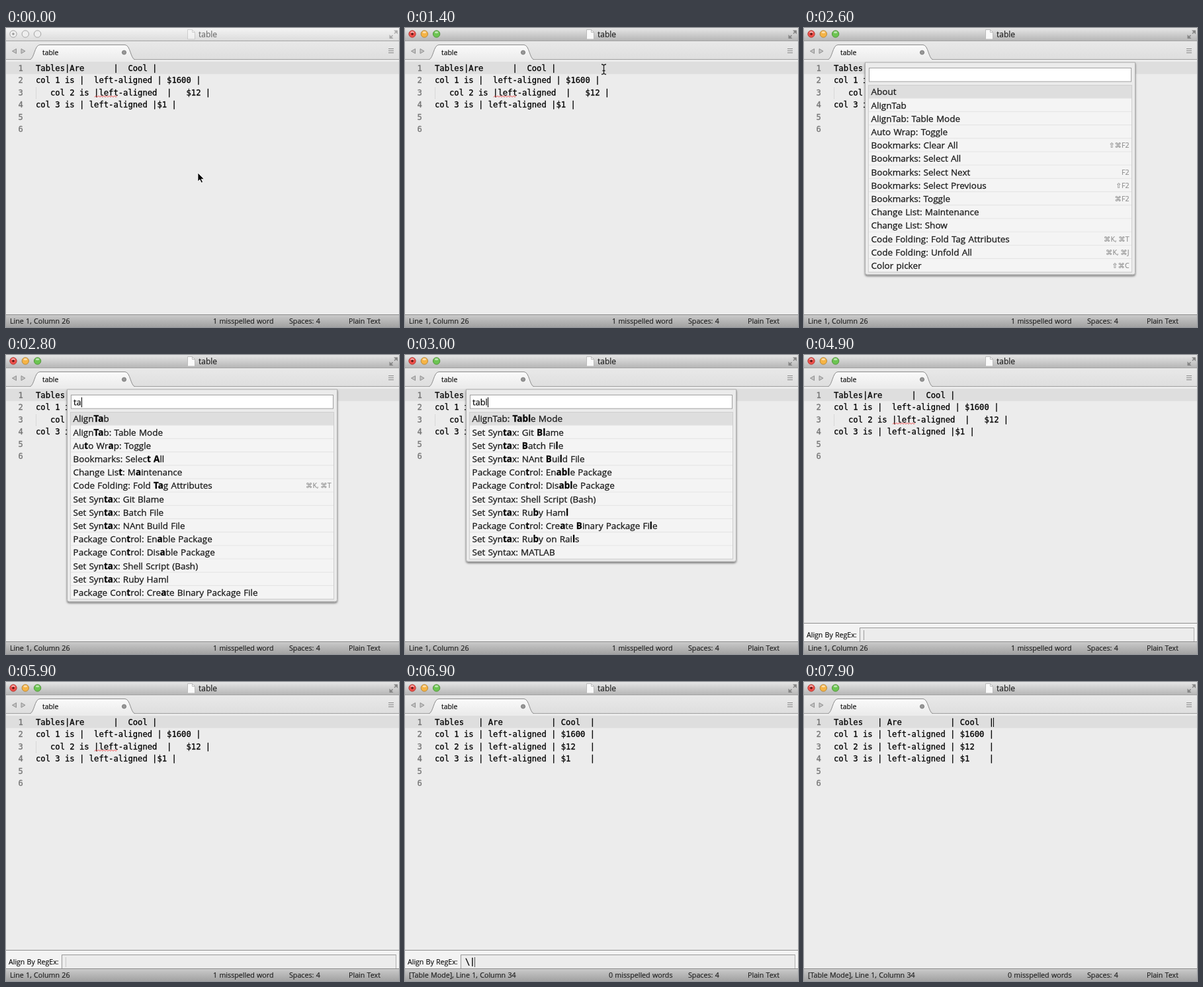
These frames come from a looping animation (594 px wide and 452 px high, 8000 ms). An HTML page:

```html
<!DOCTYPE html>
<html lang="en">
<head>
<meta charset="utf-8">
<title>Table alignment</title>
<style>
html, body { margin: 0; width: 100%; height: 100%; overflow: hidden; background: #ececec; }
svg { display: block; width: 594px; height: 452px; }
text { font: 10.7px "Open Sans", "DejaVu Sans", sans-serif; fill: #1c1c1c; stroke: #1c1c1c; stroke-width: .15px; word-spacing: .5px; white-space: pre; }
.code text { font: 12.2px "DejaVu Sans Mono", monospace; fill: #000; stroke: #000; stroke-width: .3px; word-spacing: 0; }
.code .num { fill: #757575; stroke: #757575; }
.row { font-size: 13.5px; stroke-width: .3px; word-spacing: .7px; }
.row tspan { font-weight: 700; fill: #000; }
.keys { font: 10.5px "Open Sans", "DejaVu Sans", sans-serif; fill: #8e8e8e; stroke: #8e8e8e; word-spacing: 0; text-anchor: end; }
.field { font-size: 12.8px; fill: #000; stroke-width: .25px; }
.end { text-anchor: end; }
</style>
</head>
<body>
<svg viewBox="0 0 594 452" xmlns="http://www.w3.org/2000/svg">
  <defs>
    <linearGradient id="barOn" x2="0" y2="1"><stop stop-color="#e6e6e6"/><stop offset="1" stop-color="#b6b6b6"/></linearGradient>
    <linearGradient id="barOff" x2="0" y2="1"><stop stop-color="#f4f4f4"/><stop offset="1" stop-color="#dcdcdc"/></linearGradient>
    <linearGradient id="strip" x2="0" y2="1"><stop stop-color="#e9e9e9"/><stop offset="1" stop-color="#dedede"/></linearGradient>
    <linearGradient id="tabFill" x2="0" y2="1"><stop stop-color="#fafafa"/><stop offset="1" stop-color="#ececec"/></linearGradient>
    <linearGradient id="status" x2="0" y2="1"><stop stop-color="#c9c9c9"/><stop offset="1" stop-color="#a2a2a2"/></linearGradient>
    <filter id="shadow" x="-5%" y="-5%" width="110%" height="115%">
      <feDropShadow dx="0" dy="2" stdDeviation="1.6" flood-opacity=".5"/>
    </filter>
  </defs>

  <rect width="594" height="452" fill="#ececec"/>
  <rect id="bar" width="594" height="19"/>
  <g id="lights"></g>
  <g id="caption">
    <path d="M274.5 2.5h7l4 4v10.5h-11z" fill="#fafafa" stroke="#bbb"/>
    <path d="M281.5 2.5v4h4" fill="none" stroke="#bbb"/>
    <text x="291" y="14" style="font-size:12px">table</text>
  </g>
  <g id="expand" fill="#858585" stroke="#858585" stroke-width="1.6">
    <path d="M586 3.5h6v6zM579.5 10v6h6z" stroke="none"/>
    <path d="M587 8.5l2.5-2.5M584.5 11l-2.5 2.5"/>
  </g>

  <rect y="19" width="594" height="29" fill="url(#strip)"/>
  <path d="M0 19.5h594" stroke="#a3a3a3"/>
  <path d="M0 47.5H594" stroke="#a0a0a0"/>
  <path d="M36 48C43 46 43 26 51 25.5H180C188 26 188 46 195 48" fill="url(#tabFill)" stroke="#8c8c8c"/>
  <path d="M0 48h594v3H0z" fill="#ececec"/>
  <path d="M15.5 31.5v7l-6-3.5zM23 31.5v7l6-3.5z" fill="#c4c4c4" stroke="#909090"/>
  <text x="55" y="40.5" style="font-size:10.4px;fill:#000">table</text>
  <circle cx="178.5" cy="37" r="3" fill="#999" stroke="#777"/>
  <path d="M578 31.5h8M578 34.5h8M578 37.5h8" stroke="#888" stroke-width="1.2"/>

  <rect y="51" width="594" height="18.5" fill="#dedede"/>
  <g id="code" class="code"></g>
  <rect id="codeCaret" x="286" y="54" width="1" height="14"/>
  <g id="prompt">
    <rect y="405" width="594" height="29" fill="#f3f3f3"/>
    <path d="M0 405.5h594" stroke="#8f8f8f"/>
    <text x="4" y="427" style="font-size:10.6px;fill:#000">Align By RegEx:</text>
    <rect x="84.5" y="412.5" width="505" height="21" fill="#ececec" stroke="#b0b0b0"/>
    <path d="M84.5 433v-20.5h505" fill="none" stroke="#999"/>
    <g class="code"><text id="regex" x="91" y="427"></text></g>
    <rect id="promptCaret" y="416" width="1" height="15"/>
  </g>

  <rect y="434" width="594" height="18" fill="url(#status)"/>
  <path d="M0 433.5h594" stroke="#858585"/>
  <path d="M0 434.5h594" stroke="#d0d0d0"/>
  <text id="place" x="6" y="447"></text>
  <text id="spell" class="end" x="404.5" y="447"></text>
  <text x="428" y="447">Spaces: 4</text>
  <text x="518" y="447">Plain Text</text>

  <g id="palette"></g>
  <rect id="paletteCaret" y="64" width="1" height="15"/>
  <path id="arrow" d="M0 0v13l3-2.8 2.3 4.9 2.2-1-2.3-4.7H9.4z" fill="#000" stroke="#fff" stroke-width=".8"/>
  <path id="beam" d="M-3.5 0Q0 0 0 2.5Q0 0 3.5 0M0 2V13M-3.5 15Q0 15 0 12.5Q0 15 3.5 15M-2 9.5H2" fill="none" stroke="#222" stroke-width="1.3"/>
</svg>
<script>
const LOOP = 8000, STEP = 100, ADVANCE = 7.345;
const $ = id => document.getElementById(id);
const show = (id, on) => { $(id).style.display = on ? "" : "none"; };

const rough = [
  "Tables|Are      |  Cool |",
  "col 1 is |  left-aligned | $1600 |",
  "   col 2 is |left-aligned  |   $12 |",
  "col 3 is | left-aligned |$1 |"
];
const neat = [
  "Tables   | Are          | Cool  |",
  "col 1 is | left-aligned | $1600 |",
  "col 2 is | left-aligned | $12   |",
  "col 3 is | left-aligned | $1    |"
];
const commands = [
  ["About"], ["AlignTab"], ["AlignTab: Table Mode"], ["Auto Wrap: Toggle"],
  ["Bookmarks: Clear All", "⇧⌘F2"], ["Bookmarks: Select All"],
  ["Bookmarks: Select Next", "F2"], ["Bookmarks: Select Previous", "⇧F2"],
  ["Bookmarks: Toggle", "⌘F2"], ["Change List: Maintenance"], ["Change List: Show"],
  ["Code Folding: Fold Tag Attributes", "⌘K, ⌘T"],
  ["Code Folding: Unfold All", "⌘K, ⌘J"], ["Color picker", "⇧⌘C"]
];
const found = [
  "AlignTab: Table Mode", "Set Syntax: Git Blame", "Set Syntax: Batch File",
  "Set Syntax: NAnt Build File", "Package Control: Enable Package",
  "Package Control: Disable Package", "Set Syntax: Shell Script (Bash)",
  "Set Syntax: Ruby Haml", "Package Control: Create Binary Package File",
  "Set Syntax: Ruby on Rails", "Set Syntax: MATLAB"
].map(name => [name]);

// Fuzzy match: bold the longest run of the query, then continue after it.
function mark(name, query) {
  let html = "", rest = name;
  while (query) {
    let size = query.length, at = -1;
    while (size && (at = rest.toLowerCase().indexOf(query.slice(0, size))) < 0) size--;
    if (!size) return null;
    html += `${rest.slice(0, at)}<tspan>${rest.slice(at, at + size)}</tspan>`;
    rest = rest.slice(at + size);
    query = query.slice(size);
  }
  return html + rest;
}

function matches(query) {
  if (!query) return commands;
  if (query === "tabl") return found;
  if (query === "table") return [0, 4, 5, 1, 2, 3, 8].map(i => found[i]);
  const extra = found.slice(1);
  return [...commands, ...extra].filter(([name]) => mark(name, query)).slice(0, 14);
}

function paletteHtml(query) {
  const rows = matches(query), pitch = 20.2, top = 86.5;
  const height = rows.length * pitch;
  const items = rows.map(([name, keys = ""], i) => {
    const y = top + i * pitch;
    return `<rect x="98" y="${y}" width="397" height="${pitch}" fill="${i ? "#f4f4f4" : "#dedede"}"/>
      <path d="M98 ${y + pitch - .5}h397" stroke="#e2e2e2"/>
      <text class="row" x="101.5" y="${y + 14.9}">${mark(name, query) || name}</text>
      <text class="keys" x="491.5" y="${y + 13.8}">${keys}</text>`;
  }).join("");
  return `<path d="M92.5 52H500.5V${top + height + .5}q0 3 -3 3H95.5q-3 0 -3-3z" fill="#ebebeb" stroke="#adadad" filter="url(#shadow)"/>
    <rect x="98.5" y="60.5" width="396" height="20.5" fill="#fff" stroke="#a0a0a0"/>
    <text class="field" x="102" y="76">${query}</text>
    ${items}<rect x="97.5" y="86.5" width="398" height="${height}" fill="none" stroke="#cfcfcf"/>`;
}

function codeHtml(aligned) {
  const y = i => 65 + i * 18.4;
  let html = "";
  for (let i = 0; i < 6; i++) html += `<text class="num" x="18.5" y="${y(i)}">${i + 1}</text>`;
  (aligned ? neat : rough).forEach((line, i) => {
    html += `<text x="45" y="${y(i)}">${line}</text>`;
  });
  if (!aligned) {
    let wave = "M134 104.5";
    for (let i = 1; i <= 17; i++) wave += `L${134 + i * 2} ${i % 2 ? 102.5 : 104.5}`;
    html += `<path d="${wave}" fill="none" stroke="#e33" stroke-width=".9"/>
      <path d="M45.5 90v17" stroke="#c4c4c4" stroke-dasharray="1 1"/>`;
  }
  return html;
}

function lightsHtml(active) {
  const fills = active ? ["#ee4f4a", "#f6b445", "#6cc552"] : Array(3).fill("#eee");
  const rims = active ? ["#b5453f", "#b98a3c", "#55963f"] : Array(3).fill("#a5a5a5");
  const disks = fills.map((fill, i) =>
    `<circle cx="${11 + i * 18.3}" cy="9" r="5.2" fill="${fill}" stroke="${rims[i]}"/>` +
    (active ? `<ellipse cx="${11 + i * 18.3}" cy="6.5" rx="2.8" ry="1.5" fill="#fff" opacity=".55"/>` : ""));
  return disks.join("") + `<circle cx="11" cy="9" r="1.8" fill="${active ? "#5c1512" : "#999"}"/>`;
}

// Linear track through [time, value] points.
function track(t, points) {
  const i = points.findIndex(p => p[0] > t);
  if (i < 0) return points[points.length - 1][1];
  if (!i) return points[0][1];
  const [a, b] = [points[i - 1], points[i]];
  return a[1] + (b[1] - a[1]) * (t - a[0]) / (b[0] - a[0]);
}
const pick = (t, points) => points.filter(p => p[0] <= t).pop()[1];

const paletteBlink = [[2000, 1], [2300, 0], [2600, 0], [2700, 1], [3500, 1], [3800, 0],
  [4000, 0], [4300, 1], [4600, 1]];
const promptBlink = [[4700, 1], [5000, 0], [5100, 0], [5500, 1], [5600, 1], [5900, .15],
  [6000, 0], [6200, 1], [6800, 1], [7100, 0], [7300, 0], [7400, 1]];

const cache = {};
function setHtml(id, key, build) {
  if (cache[id] === key) return;
  cache[id] = key;
  $(id).innerHTML = build(key);
}

function draw(t) {
  const active = t >= 1000, aligned = t >= 6600;
  $("bar").setAttribute("fill", `url(#${active ? "barOn" : "barOff"})`);
  $("caption").style.opacity = $("expand").style.opacity = active ? 1 : .6;
  setHtml("lights", active, lightsHtml);
  setHtml("code", aligned, codeHtml);
  $("place").textContent = aligned ? "[Table Mode], Line 1, Column 34" : "Line 1, Column 26";
  $("spell").textContent = aligned ? "0 misspelled words" : "1 misspelled word";

  const open = t >= 1700 && t < 4600;
  const query = pick(t, [[0, ""], [2700, "t"], [2800, "ta"], [2900, "tab"], [3000, "tabl"], [3300, "table"]]);
  show("palette", open);
  show("paletteCaret", open);
  setHtml("palette", query, paletteHtml);
  const ends = [102, 106.5, 113.6, 121.4, 124.7, 131.9];
  $("paletteCaret").setAttribute("x", Math.round(ends[query.length]));
  $("paletteCaret").style.opacity = track(t, paletteBlink);

  const regex = pick(t, [[0, ""], [6400, "\\"], [6600, "\\|"]]);
  show("prompt", t >= 4600 && t < 7600);
  $("regex").textContent = regex;
  $("promptCaret").setAttribute("x", Math.round(90 + regex.length * ADVANCE));
  $("promptCaret").style.opacity = track(t, promptBlink);
  show("codeCaret", t >= 7600);
  $("codeCaret").style.opacity = track(t, [[7700, .8], [7900, 1]]);

  const p = track(t, [[300, 0], [1100, 1]]), ease = p * p * (3 - 2 * p);
  const x = 290 + 10.5 * ease, y = 219 - 164 * ease;
  show("arrow", !active);
  show("beam", active && t < 1700);
  $("arrow").setAttribute("transform", `translate(${x} ${y})`);
  $("beam").setAttribute("transform", `translate(${x} ${y})`);
}

const start = performance.now();
function tick(now) {
  const t = Math.max(0, now - start) % LOOP;
  draw(Math.floor(t / STEP) * STEP);
  requestAnimationFrame(tick);
}
draw(0);
requestAnimationFrame(tick);
</script>
</body>
</html>
```
